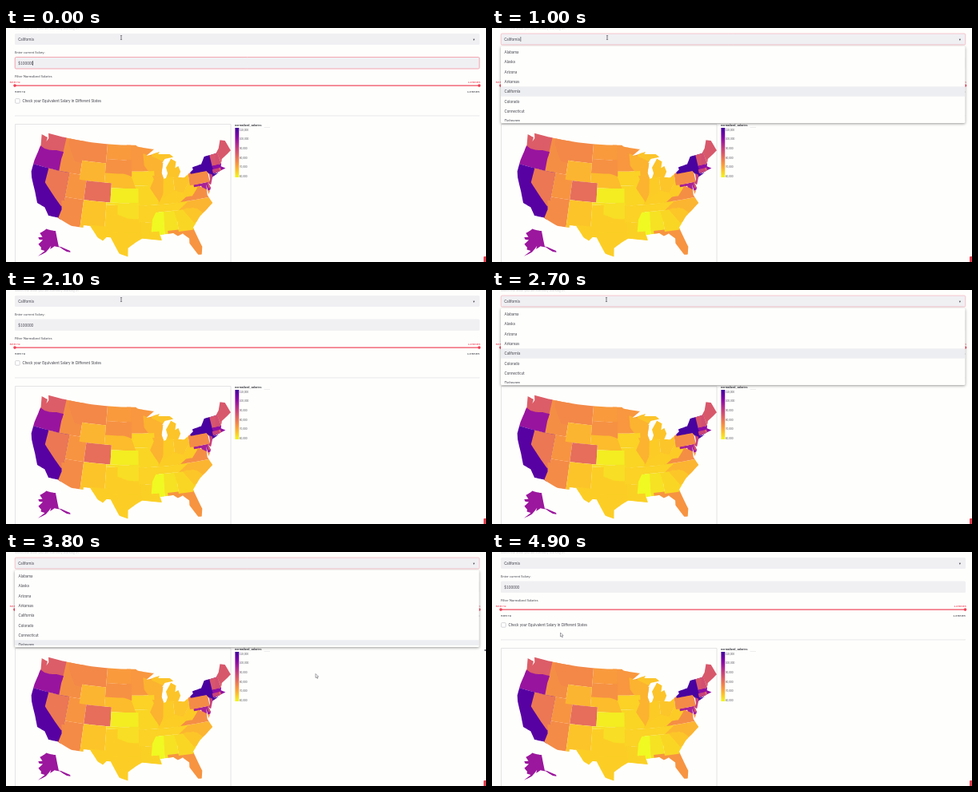
These frames come from a looping animation (600 px wide and 293 px high, 5 s). An HTML page with a canvas:

```html
<!DOCTYPE html>
<html lang="en">
<head>
<meta charset="utf-8">
<title>Salary map</title>
<style>
html, body { margin: 0; width: 100%; height: 100%; overflow: hidden; background: #fefefc; }
canvas { display: block; width: 600px; height: 293px; }
</style>
</head>
<body>
<canvas id="stage" width="600" height="293"></canvas>
<script>
const W = 600, H = 293, LOOP = 5000;
const SANS = 'Lato, "Open Sans", sans-serif';
const MONO = '"Liberation Mono", monospace';
const ARIAL = '"Liberation Sans", sans-serif';
const INK = '#474852', RED = '#f0445a', FIELD = '#f0f0f3', PAPER = '#fefefc';
const ctx = document.getElementById('stage').getContext('2d');
const page = document.createElement('canvas');
page.width = W;
page.height = H;
const pg = page.getContext('2d');

function text(c, str, x, y, size, color = INK, align = 'left', family = SANS, weight = 400) {
  c.font = `${weight} ${size}px ${family}`;
  c.textAlign = align;
  c.fillStyle = color;
  c.fillText(str, x, y);
}

function box(c, x, y, w, h, r, fill, stroke, line = 0.8) {
  c.beginPath();
  c.roundRect(x, y, w, h, r);
  if (fill) { c.fillStyle = fill; c.fill(); }
  if (stroke) { c.strokeStyle = stroke; c.lineWidth = line; c.stroke(); }
}

// Plasma colours from the highest salary (110k) to the lowest (60k)
const RAMP = ['#42039d', '#6a00a8', '#8f0da4', '#b12a90', '#cc4778', '#e16462', '#f2844b', '#fca636', '#fcce25', '#f0f921'];

function tone(salary) {
  const u = (110 - salary) / 50 * (RAMP.length - 1);
  const i = Math.min(RAMP.length - 2, Math.floor(u));
  const part = (hex, k) => parseInt(hex.slice(k, k + 2), 16);
  const mix = k => Math.round(part(RAMP[i], k) + (part(RAMP[i + 1], k) - part(RAMP[i], k)) * (u - i));
  return `rgb(${mix(1)},${mix(3)},${mix(5)})`;
}

// Albers equal-area conic; longitudes are given in degrees west
function albers(meridian, lat1, lat2, midLon, midLat, scale, tx, ty) {
  const rad = Math.PI / 180, s1 = Math.sin(lat1 * rad);
  const n = (s1 + Math.sin(lat2 * rad)) / 2;
  const k = 1 + s1 * (2 * n - s1);
  const raw = (lon, lat) => {
    const rho = Math.sqrt(k - 2 * n * Math.sin(lat * rad)) / n;
    const a = (meridian - lon) * rad * n;
    return [rho * Math.sin(a), rho * Math.cos(a)];
  };
  const mid = raw(midLon, midLat);
  return (lon, lat) => {
    const p = raw(lon, lat);
    return [tx + (p[0] - mid[0]) * scale, ty + (p[1] - mid[1]) * scale];
  };
}

const K = 345.5, MX = 156.2, MY = 209;
const mainland = albers(96, 29.5, 45.5, 96.6, 38.7, K, MX, MY);
const arctic = albers(154, 55, 65, 156, 58.5, K * 0.35, MX - 0.307 * K, MY + 0.201 * K);

// Edges are subdivided so that parallels come out curved
function trace(coords, project = mainland, steps = 6) {
  const n = coords.length;
  pg.beginPath();
  for (let i = 0; i < n; i += 2) {
    const lon = coords[i], lat = coords[i + 1];
    const dLon = coords[(i + 2) % n] - lon, dLat = coords[(i + 3) % n] - lat;
    for (let s = 0; s < steps; s++) pg.lineTo(...project(lon + dLon * s / steps, lat + dLat * s / steps));
  }
  pg.closePath();
}

// Four numbers mean a west, north, east, south cell; more are corners
function state(salary, ...c) {
  trace(c.length > 4 ? c : [c[0], c[1], c[2], c[1], c[2], c[3], c[0], c[3]]);
  pg.fillStyle = tone(salary);
  pg.fill();
}

function clipToCoast() {
  const north = [122.8,49, 95.2,49, 94.6,48.7, 92,48.3, 89.6,48, 92.1,46.7, 90.6,46.9, 88,47.4, 88.4,46.9, 85,46.7, 84,46, 86.6,45.8, 87.7,44.9];
  const lakes = [87.2,45.1, 87.9,43, 87.4,41.7, 86.8,41.8, 86.2,42.8, 86.5,44, 84.8,45.7, 83.4,45, 83.9,43.7, 82.9,44, 82.5,42.8, 83.4,41.7, 81.7,41.5, 78.9,42.8, 79,43.3, 76.3,43.6];
  const atlantic = [75,45, 71.4,45.1, 70.3,45.9, 69.2,47.5, 67.8,47.1, 67,44.8, 70.2,43.6, 71,42.2, 69.9,41.6, 73.7,41, 72,41.1, 74,40.5, 74.9,39, 75.5,39.6, 75.1,38.4, 76,37.2, 76.1,39.3, 76.4,37.1, 75.5,35.3, 77.9,33.9, 79.2,33.2, 81.4,31];
  const gulf = [80,26.8, 80.4,25.2, 81.2,25.3, 82.8,27.9, 82.7,28.9, 84.1,30.1, 85.3,29.7, 86.3,30.4, 89.5,30.3, 89.2,29.1, 93.8,29.7, 95.4,28.9, 97.2,27.7, 97.2,25.9];
  const south = [99.2,26.5, 101.4,29.8, 102.4,29.8, 103.2,29, 104.5,29.6, 106.5,31.8, 108.2,31.8, 108.2,31.3, 111.1,31.3, 114.8,32.5, 117.1,32.5];
  const pacific = [118.5,34, 120.6,34.5, 121.9,36.6, 123.8,39.2, 124.4,40.4, 124.5,42.8, 124,46.2, 124.7,48.4, 122.7,48.1, 122.7,47.2, 122.3,48];
  trace([...north, ...lakes, ...atlantic, ...gulf, ...south, ...pacific]);
  pg.clip();
}

// Neighbours overlap: each state covers the spare part of those before it
function drawWest() {
  state(75, 118, 50, 111, 42);
  state(83.5, 125, 50, 117, 45);
  state(97.5, 125,46.3, 122.7,45.7, 121,45.7, 119,46, 116.9,46, 117.1,44.4, 117,42, 125,42);
  state(76, 116,50, 104,50, 104,45, 111,45, 111,44.5, 113,44.5, 114.4,46, 116,48);
  state(107, 125, 42, 114, 32);
  state(79, 120,42, 114,42, 114,35, 114.6,35, 120,39);
  state(75.5, 114,37, 109,37, 109,31, 115,31, 114.2,34.3, 114.7,36.1, 114,36.2);
  state(74, 114, 42, 109, 37);
  state(69, 111, 45, 104, 41);
  state(80.5, 109, 41, 102, 37);
  state(67, 109, 37, 103, 31);
}

function drawPlains() {
  state(73.5, 98, 50, 89, 43.5);
  state(67, 90.5, 47.5, 82, 41.7);
  state(69.3, 93,47.2, 90.4,46.6, 87.7,45.5, 87,45.3, 87.5,42.5, 90.6,42.5, 92.8,44.7);
  state(65, 97, 43.5, 90, 40.6);
  state(73, 104, 50, 96.7, 45.9);
  state(74.5, 104, 45.9, 96.4, 42.5);
  state(64.7, 97, 40.6, 89, 36.5);
  state(68, 104,43, 98.5,43, 96.5,42.5, 95.3,40, 102,40, 102,41, 104,41);
  state(61.5, 102, 40, 94.6, 37);
  state(65.5, 106.6, 32, 93, 25);
  state(65.5, 103, 36.5, 93, 31);
  state(63.5, 103,37, 94.4,37, 94.4,33.7, 97.2,33.8, 100,34.6, 100,36.5, 103,36.5);
  state(65, 94.6, 36.5, 89.5, 33);
  state(65.3, 94, 33, 88.5, 28);
}

function drawSouthEast() {
  state(65.7, 89.5, 39.2, 82, 36.5);
  state(69.3, 90.6,42.5, 87.5,42.5, 87.5,39.3, 89.1,37, 91.4,40, 90.2,41.8);
  state(66, 87.5,42, 84.8,42, 84.8,39.1, 88.1,37.8);
  state(66, 82.6,38.4, 82,37.4, 77.7,37.4, 77.7,39.7, 80.5,40.7);
  state(66.8, 84.8,41.7, 80.5,42.5, 80.5,40.6, 82.6,38.4, 84.8,39.1);
  state(63, 88.4, 35, 85, 30);
  state(60, 90.2,35, 88.2,35, 88.4,30, 89.6,30, 89.7,31, 91.6,31, 91.2,33.5);
  state(74, 87.6, 31, 79, 24);
  state(69, 84.3, 36.6, 75, 33);
  state(64.5, 85.6,35, 80.5,35, 80.5,30.6, 85,30.6, 85,32.5);
  state(66.7, 83.3,35, 82.3,35.2, 79.7,34.8, 78.5,33.8, 79,32, 81,32);
  state(65, 89.6,36.5, 81.6,36.6, 84.3,35, 90.2,35);
}

function drawNorthEast() {
  state(95, 79.5,39.7, 75,39.7, 75,37.9, 77.3,38, 77.5,39.2, 79.5,39.2);
  state(75, 83.7,36.6, 82,37.5, 80.3,37.5, 78.3,39.3, 77.2,38.8, 75.5,37.8, 75.5,36.6);
  state(85, 75.7, 39.8, 75, 38.5);
  state(75.5, 80.5, 42.4, 75, 39.7);
  state(109, 79.8,42, 75.3,42, 74.1,40.4, 71.5,40.4, 71.5,45.1, 79.8,45.1);
  state(89, 74.7,41.4, 73.9,41, 73.9,39, 75.5,38.9, 74.8,40.2);
  state(85, 73.4, 45.1, 71.5, 42.7);
  state(86, 71.5,45.3, 71,45.3, 70.7,42.7, 72.5,42.7);
  state(84.5, 71.1,45.4, 72,48, 66,48, 66,43, 70.7,43);
  state(99, 73.4, 42.7, 69.5, 41.3);
  state(88.5, 73.6, 42, 71.8, 41.2);
  state(83, 71.8, 42, 71.2, 41.2);
}

function drawMap() {
  pg.save();
  clipToCoast();
  drawWest();
  drawPlains();
  drawSouthEast();
  drawNorthEast();
  pg.restore();
  trace([141,69.6, 141,60.3, 137.5,59.4, 130,55.9, 130.2,55, 133.6,56, 139.7,59.6, 146,60.7, 151.5,59.2, 150,61.2, 156.5,57.3, 164.5,54.6, 157.5,58.2, 162,58.7, 162,60, 166,61.7, 161,64.5, 166,64.5, 168,65.6, 162,66.3, 166.7,68.3, 156.6,71.3], arctic);
  pg.fillStyle = tone(97);
  pg.fill();
}

function drawLegend() {
  const ramp = pg.createLinearGradient(0, 125, 0, 187);
  RAMP.forEach((c, i) => ramp.addColorStop(i / (RAMP.length - 1), c));
  pg.fillStyle = ramp;
  pg.fillRect(286.4, 125, 4.8, 62);
  text(pg, 'normalized_salaries', 286, 123, 3.5, '#33343c', 'left', ARIAL, 700);
  for (let i = 0; i < 6; i++) {
    text(pg, `${110 - i * 10},000`, 291.8, 128.5 + i * 11.7, 3.2, '#55565e', 'left', ARIAL);
  }
  box(pg, 322.5, 124.2, 7.5, 0.6, 0.3, '#dcdce0');
}

function drawSlider() {
  pg.fillStyle = RED;
  pg.fillRect(11, 71.5, 581, 1.2);
  for (const x of [11, 591.5]) {
    pg.beginPath();
    pg.arc(x, 72.1, 1.8, 0, 7);
    pg.fill();
  }
  text(pg, '58579', 11, 69, 4.4, RED, 'center', MONO);
  text(pg, '135805', 593, 69, 4.4, RED, 'right', MONO);
  text(pg, '58579', 11, 81, 4.4, INK, 'left', MONO);
  text(pg, '135805', 592, 81, 4.4, INK, 'right', MONO);
}

function drawPage() {
  pg.fillStyle = PAPER;
  pg.fillRect(0, 0, W, H);
  text(pg, 'Select the State you are currently working in:', 11, 2, 4.1, '#d9d9de');
  box(pg, 11, 7, 581, 14, 1.5, FIELD);
  text(pg, 'California', 15.2, 15.8, 4.7);
  text(pg, '▾', 585, 15.6, 4.5, INK, 'center', '"DejaVu Sans", sans-serif');
  text(pg, 'Enter current Salary:', 11, 31.7, 4.2);
  box(pg, 11, 36.5, 581, 14.5, 1.5, FIELD);
  text(pg, '$100000', 15.3, 45.6, 4.7);
  text(pg, 'Filter Normalized Salaries', 11, 61.7, 4.2);
  drawSlider();
  box(pg, 11.6, 88.6, 5.6, 5.6, 1, '#fff', '#c4c5cb', 0.7);
  text(pg, 'Check your Equivalent Salary in Different States', 20.6, 93, 4.72);
  pg.fillStyle = '#e6e6ea';
  pg.fillRect(11, 109.5, 581, 0.9);
  box(pg, 11.5, 120.5, 269.5, 180, 0, null, '#dedee0');
  drawMap();
  drawLegend();
  box(pg, 597, 286, 6, 10, 1, '#e5404f');
}

const OPTIONS = ['Alabama', 'Alaska', 'Arizona', 'Arkansas', 'California', 'Colorado', 'Connecticut', 'Delaware'];
const ROW = 12.33, LIST_TOP = 24;

function drawMenu(active) {
  ctx.save();
  ctx.shadowColor = 'rgba(0,0,0,.4)';
  ctx.shadowBlur = 3.5;
  ctx.shadowOffsetY = 1;
  box(ctx, 11, 22.5, 580.5, 96.5, 1.5, PAPER);
  ctx.restore();
  ctx.save();
  ctx.beginPath();
  ctx.rect(11, 22, 580.5, 95);
  ctx.clip();
  ctx.fillStyle = '#edeef1';
  ctx.fillRect(11, LIST_TOP + active * ROW, 580.5, ROW);
  OPTIONS.forEach((name, i) => text(ctx, name, 15.6, 32 + i * ROW, 4.7));
  ctx.restore();
}

function drawCaret(x, y) {
  ctx.fillStyle = '#33343c';
  ctx.fillRect(x, y, 0.6, 6);
}

function drawBeam(x, y) {
  ctx.fillStyle = '#55555c';
  ctx.fillRect(x - 0.4, y - 2.5, 0.8, 5);
  for (const dy of [-2.8, 2.2]) ctx.fillRect(x - 1.1, y + dy, 2.2, 0.6);
}

function drawArrow(x, y) {
  ctx.beginPath();
  [[0, 0], [0, 5], [1.2, 4], [2, 5.9], [2.9, 5.5], [2.1, 3.7], [3.6, 3.6]]
    .forEach(p => ctx.lineTo(x + p[0], y + p[1]));
  ctx.closePath();
  ctx.fillStyle = '#fff';
  ctx.fill();
  ctx.strokeStyle = '#66666e';
  ctx.lineWidth = 0.6;
  ctx.stroke();
}

function glide(t, start, end, from, to) {
  const u = Math.min(1, Math.max(0, (t - start) / (end - start)));
  const e = u * u * (3 - 2 * u);
  return [from[0] + (to[0] - from[0]) * e, from[1] + (to[1] - from[1]) * e];
}

function pointer(t) {
  if (t < 2500) return [144, 12];
  if (t < 4200) return glide(t, 3150, 3700, [143, 12], [387, 152.5]);
  return glide(t, 4200, 4850, [387, 152.5], [85.5, 101]);
}

function render(t) {
  const first = t >= 600 && t < 2000;
  const second = t >= 2500 && t < 4100;
  const [x, y] = pointer(t);
  ctx.drawImage(page, 0, 0);

  if (t < 400) {
    box(ctx, 11.2, 36.5, 580.6, 14.5, 1.5, null, '#f3919d');
    drawCaret(33, 41);
  }
  if (first || second) {
    box(ctx, 11.2, 7, 580.6, 14, 1.5, null, '#f5b0ba', 0.7);
    drawMenu(y < LIST_TOP ? 4 : Math.min(7, Math.floor((y - LIST_TOP) / ROW)));
  }
  const blink = (t - 600) % 1000 < 500;
  if ((t >= 400 && t < 600) || (first && blink)) drawCaret(35.6, 11);
  if (t >= 3700 && second) {
    ctx.fillStyle = '#77777d';
    ctx.fillRect(598, 122, 2, 2);
  }
  if (y < 22) drawBeam(x, y);
  else drawArrow(x, y);
}

drawPage();
function tick(now) {
  render(now % LOOP);
  requestAnimationFrame(tick);
}
render(0);
requestAnimationFrame(tick);
</script>
</body>
</html>
```
